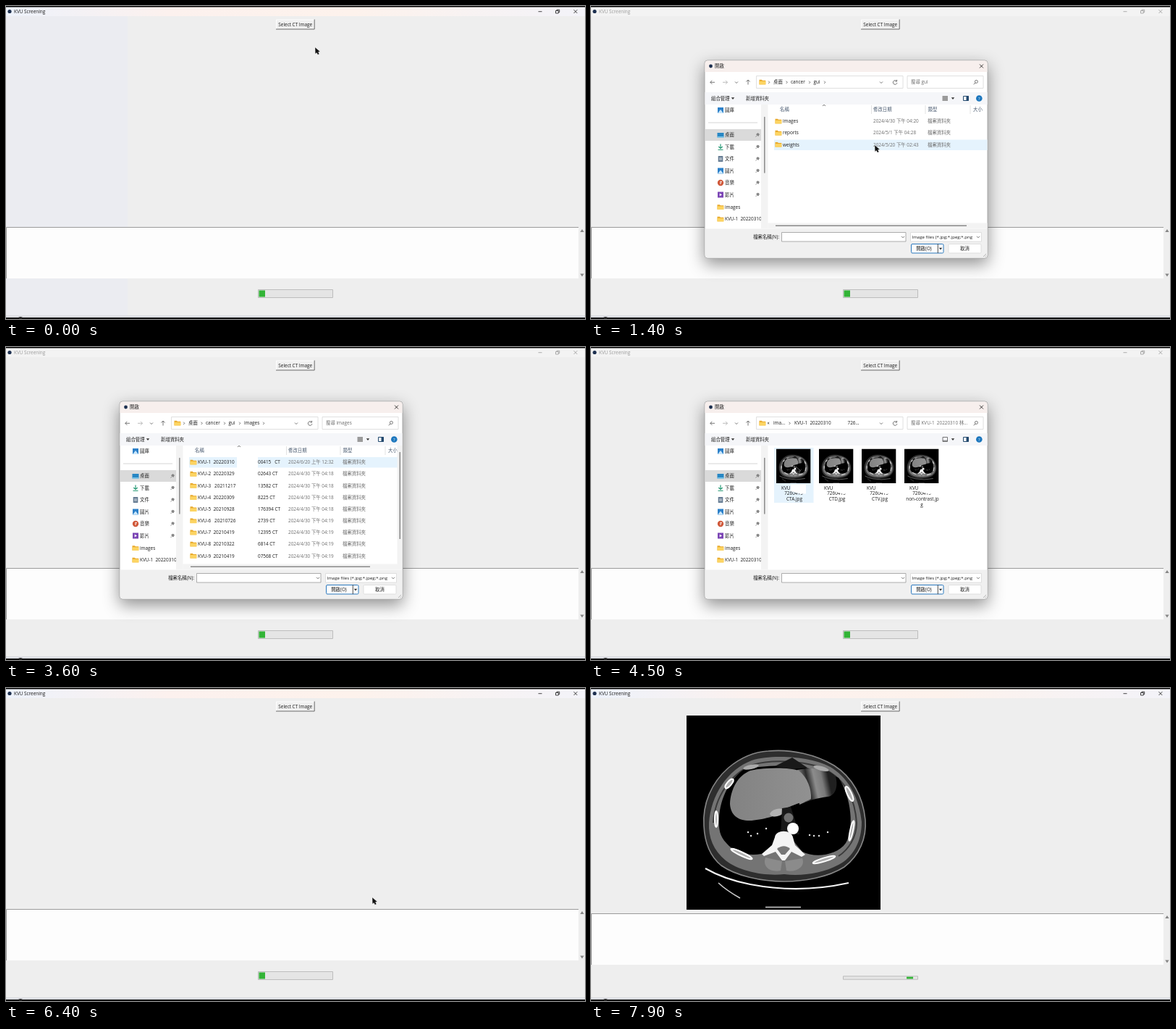
Write an HTML page that moves like this. It is 800 px wide and 432 px high and loops after 8000 ms.

```html
<!DOCTYPE html>
<html lang="zh-Hant">
<head>
<meta charset="utf-8">
<title>KVU Screening</title>
<style>
html, body { margin: 0; width: 800px; height: 432px; overflow: hidden; background: #eee; }
svg { display: block; }
text { font: 6.4px 'Open Sans', 'Noto Sans CJK TC', 'Noto Sans CJK JP', sans-serif; fill: #1c1c1c; white-space: pre; }
.soft { fill: #6d6d6d; }
.head { fill: #47586e; }
.mid { text-anchor: middle; }
.line { fill: none; stroke: #555; stroke-width: .8; }
.box { fill: #fff; stroke: #d9d9d9; stroke-width: .8; }

/* parts that switch on and off */
.s { opacity: 0; animation: 8s step-end infinite; }
.tint { animation-name: tint; }
.active { animation-name: active; }
.idle { animation-name: idle; }
.gui { animation-name: gui; }
.images { animation-name: images; }
.files { animation-name: files; }
.listed { animation-name: listed; }
.row0 { animation-name: row0; }
.row1 { animation-name: row1; }
.row2 { animation-name: row2; }
.picked { animation-name: picked; }
.hover { animation-name: hover; }
.chosen { animation-name: chosen; }
.before { animation-name: before; }
.after { animation-name: after; }
@keyframes tint { 0% { opacity: 1 } 3.75% { opacity: 0 } }
@keyframes active { 0% { opacity: 1 } 12.5% { opacity: 0 } 75% { opacity: 1 } 100% { opacity: 1 } }
@keyframes idle { 12.5% { opacity: 1 } 75% { opacity: 0 } }
@keyframes gui { 12.5% { opacity: 1 } 35% { opacity: 0 } }
@keyframes images { 35% { opacity: 1 } 48.75% { opacity: 0 } }
@keyframes files { 48.75% { opacity: 1 } 75% { opacity: 0 } }
@keyframes listed { 12.5% { opacity: 1 } 48.75% { opacity: 0 } }
@keyframes row2 { 16.25% { opacity: 1 } 22.5% { opacity: 0 } }
@keyframes row1 { 22.5% { opacity: 1 } 24.375% { opacity: 0 } }
@keyframes row0 { 24.375% { opacity: 1 } 28.75% { opacity: 0 } }
@keyframes picked { 28.75% { opacity: 1 } 35% { opacity: 0 } }
@keyframes hover { 55% { opacity: 1 } 58.75% { opacity: 0 } }
@keyframes chosen { 58.75% { opacity: 1 } 75% { opacity: 0 } }
@keyframes before { 0% { opacity: 1 } 81.25% { opacity: 0 } }
@keyframes after { 81.25% { opacity: 1 } 100% { opacity: 1 } }

.dialog { animation: dialog 8s linear infinite; }
@keyframes dialog { 0%, 12.4% { opacity: 0 } 13.75%, 74.9% { opacity: 1 } 75%, 100% { opacity: 0 } }
.low { animation: low 8s step-end infinite; }
@keyframes low { 0% { transform: none } 81.25%, 100% { transform: translateY(6px) } }
.chunk { animation: chunk 8s linear infinite; }
@keyframes chunk { 0%, 80.625% { transform: none } 100% { transform: translateX(93px) } }
.cursor { animation: cursor 8s ease-in-out infinite; }
@keyframes cursor {
  0%, 1.25% { transform: translate(427px, 57px) }
  8.75%, 12.5% { transform: translate(405px, 27px) }
  17.5%, 18.75% { transform: translate(392px, 192px) }
  27.5%, 35% { transform: translate(295px, 157px) }
  41%, 50% { transform: translate(329px, 155px) }
  56.25%, 60% { transform: translate(283px, 165px) }
  68.75% { transform: translate(424px, 306px) }
  72.5%, 75% { transform: translate(457px, 333px) }
  80%, 86% { transform: translate(506px, 289px) }
  94%, 100% { transform: translate(560px, 440px) }
}
</style>
</head>
<body>
<svg width="800" height="432" viewBox="0 0 800 432">
<defs>
  <linearGradient id="bar">
    <stop offset="0" stop-color="#edf2fb"/><stop offset=".28" stop-color="#fcf1ee"/>
    <stop offset=".6" stop-color="#fdf2ec"/><stop offset="1" stop-color="#f3f3f9"/>
  </linearGradient>
  <linearGradient id="heart" x1="0" y1=".2" x2="1" y2="0">
    <stop offset="0" stop-color="#8c8c8c"/><stop offset=".22" stop-color="#2a2a2a"/>
    <stop offset=".4" stop-color="#8c8c8c"/><stop offset=".58" stop-color="#7a7a7a"/><stop offset=".75" stop-color="#202020"/>
  </linearGradient>
  <linearGradient id="liver">
    <stop offset="0" stop-color="#828282"/><stop offset="1" stop-color="#919191"/>
  </linearGradient>
  <clipPath id="side"><path d="M157 136H235V307H157Z"/></clipPath>
  <clipPath id="kind"><path d="M441 312H530V326H441Z"/></clipPath>
  <g id="folder">
    <path d="M-4.5 -3.3H-1.2L0 -2.2H4.3V3.3H-4.5Z" fill="#e8a92c"/>
    <path d="M-4.5 -1.2H4.3V3.5H-4.5Z" fill="#fcd462"/>
  </g>
  <path id="right" class="line" d="M-.9 -1.7L.8 0L-.9 1.7"/>
  <path id="down" class="line" d="M-2 -1L0 1L2 -1"/>
  <path id="drop" d="M-2.2 -1.2H2.2L0 1.4Z" fill="#333"/>
  <g id="pin" stroke="#777" stroke-width=".8"><path d="M-2.5 2.5L-.5 .5"/><path d="M-1.5 -1L1 1.5L2.4 -.9L.9 -2.4Z" fill="#888"/></g>
  <symbol id="scan" viewBox="132.6 38.5 266.8 266.8">
    <path d="M132 38H400V306H132Z"/>
    <path d="M156 190C154 160 166 131 190 110C208 95 228 88 245 87C277 84 311 92 336 107C361 123 376 150 379 182C381 207 371 231 350 247C328 261 295 267 267 267C235 267 200 259 180 245C164 232 157 213 156 190Z" fill="#2e2e2e" stroke="#868686" stroke-width="1.6"/>
    <path d="M163 186C166 148 188 113 222 100C250 91 308 94 334 111C358 127 371 155 374 185C374 212 362 234 342 244C320 256 290 260 267 257C240 260 205 253 186 238C169 224 162 206 163 186Z" fill="#747474"/>
    <path d="M169 186C171 150 193 118 224 106C250 98 305 100 330 116C354 131 365 157 367 186C367 206 356 223 342 232" fill="none" stroke="#3a3a3a" stroke-width="2"/>
    <path d="M177 180C178 151 194 123 212 112C250 104 310 106 342 124C360 150 364 196 352 214C340 231 310 235 292 226L267 196L246 226C225 234 200 230 187 214C178 205 176 194 177 180Z"/>
    <path d="M254 108L278 96L299 110L278 112Z" fill="#191919"/>
    <path d="M285 113C304 109 328 110 338 122C342 137 337 149 327 150C313 152 300 155 288 161Z" fill="url(#heart)"/>
    <path d="M192 160C193 139 203 121 220 114C245 109 275 110 287 114C299 123 305 140 304 153C297 157 284 159 272 165C262 176 240 181 222 183C205 184 193 177 192 160Z" fill="url(#liver)"/>
    <ellipse cx="257" cy="172" rx="10" ry="5" fill="#b4b4b4" transform="rotate(-15 257 172)"/>
    <path d="M264 166L276 164L288 202H262Z" fill="#191919"/>
    <circle cx="273" cy="179" r="6.5" fill="#707070"/>
    <circle cx="279" cy="194" r="8" fill="#fff"/>
    <path d="M241 234L264 239L262 252C250 255 236 248 241 234ZM268 239L292 235C297 248 281 255 270 252Z" fill="#8b8b8b"/>
    <path d="M254 206C255 195 277 195 279 206L282 217L296 230L291 233L277 226L268 238L264 238L255 226L239 232L236 229L250 217Z" fill="#f4f4f4"/>
    <path d="M257 222C263 217 270 217 275 222L268 230H263Z" fill="#777"/>
    <g fill="#b0b0b0" stroke="#fff" stroke-width="2">
      <ellipse cx="191" cy="132" rx="3" ry="8" transform="rotate(40 191 132)"/>
      <ellipse cx="173" cy="181" rx="2" ry="11"/>
      <ellipse cx="208" cy="229" rx="16" ry="2.5" transform="rotate(25 208 229)"/>
      <ellipse cx="357" cy="146" rx="3" ry="11" transform="rotate(-25 357 146)"/>
      <ellipse cx="360" cy="197" rx="2" ry="14" transform="rotate(12 360 197)"/>
      <ellipse cx="322" cy="237" rx="16" ry="2.5" transform="rotate(-17 322 237)"/>
    </g>
    <g fill="#aaa"><ellipse cx="221" cy="109" rx="11" ry="3" transform="rotate(-12 221 109)"/><ellipse cx="318" cy="111" rx="11" ry="3" transform="rotate(15 318 111)"/></g>
    <path d="M217 199h.1M221 204h.1M230 201h.1M242 194h.1M302 203h.1M308 204h.1M315 204h.1M327 199h.1" stroke="#ddd" stroke-width="2.4" stroke-linecap="round"/>
    <path d="M158 249Q184 264 220 271Q288 284 356 269" fill="none" stroke="#f4f4f4" stroke-width="2.2"/>
    <path d="M176 269Q188 280 206 290M241 302.5H290" fill="none" stroke="#ccc" stroke-width="1.6"/>
  </symbol>
</defs>

<path d="M0 0H800V432H0Z" fill="#eee"/>
<path class="s tint" d="M0 14H168V427H0Z" fill="#ebecf1"/>

<!-- main window -->
<path d="M0 1H800V14H0Z" fill="#f3f3f3"/>
<path class="s active" d="M0 1H800V14H0Z" fill="url(#bar)"/>
<circle cx="5" cy="7.5" r="2.6" fill="#1d3050"/>
<g id="caption"></g>
<path d="M0 427H800V430H0Z" fill="#dcdde2"/>
<path d="M0 0H800V1.6H0ZM0 430H800V432H0Z"/>
<ellipse cx="20" cy="430.5" rx="3" ry="1.6" fill="#222"/>
<path d="M373 18.5H426.5V32.5H373Z" fill="#f0f0f0"/>
<path d="M373.5 32V19H426" fill="none" stroke="#fff"/>
<path d="M373 32H426.2V18.5" fill="none" stroke="#6a6a6a"/>
<text class="mid" x="399.8" y="28.2">Select CT Image</text>
<use class="s after" href="#scan" x="132.6" y="38.5" width="266.8" height="266.8"/>
<g class="low">
  <path d="M0 305H791V376H0Z" fill="#fdfdfd"/>
  <path d="M.5 376V305.5H791" fill="none" stroke="#9a9a9a"/>
  <path d="M793.3 312L796 308L798.7 312ZM793.3 369.5L796 373.5L798.7 369.5Z" fill="#868686"/>
</g>
<g class="s before">
  <path d="M348.5 391.5H451.5V402.5H348.5Z" fill="#e5e5e5" stroke="#bdbdbd"/>
  <path class="chunk" d="M349.5 392.5H358V401.5H349.5Z" fill="#32b436"/>
</g>
<g class="s after">
  <path d="M348.5 397.8H451.5V402.2H348.5Z" fill="#e5e5e5" stroke="#bdbdbd"/>
  <path class="chunk" d="M349 398.6H358V401.4H349Z" fill="#32b436"/>
</g>

<!-- file dialog -->
<g class="dialog">
  <rect x="157" y="75" width="391" height="273" rx="4" fill="#fff" stroke="#a8a8a8" style="filter: drop-shadow(0 8px 11px rgba(0,0,0,.42))"/>
  <path d="M157.5 91V79Q157.5 75.5 161 75.5H544Q547.5 75.5 547.5 79V91Z" fill="#f7efed"/>
  <circle cx="165.5" cy="83" r="2.4" fill="#1d3050"/>
  <text x="171" y="85.4">開啟</text>
  <path class="line" style="stroke:#111" d="M537 80.5L542 85.5M542 80.5L537 85.5"/>
  <path class="line" d="M171 105.3H164.8M167.3 102.8L164.8 105.3L167.3 107.8"/>
  <path class="line" style="stroke:#aaa" d="M182 105.3H188.5M186 102.8L188.5 105.3L186 107.8"/>
  <path class="line" d="M217 108.5V102M214.5 104.5L217 102L219.5 104.5"/>
  <use href="#down" x="201" y="105.5"/>
  <path class="box" d="M228.5 96.5H431V113.5H228.5ZM437 96.5H542V113.5H437Z"/>
  <use href="#folder" x="237" y="105"/>
  <use href="#down" x="401" y="105.5"/>
  <path class="line" d="M422.3 103.7A2.8 2.8 0 1 0 422.9 106M422.6 101.8V104H420.4"/>
  <path class="line" d="M531 106L528.7 108.3M534.4 104.4A2 2 0 1 1 530.4 104.4A2 2 0 1 1 534.4 104.4"/>
  <path d="M157.5 119H547.5V136H157.5Z" fill="#f5f6f9"/>
  <text x="166" y="129.7">組合管理</text><use href="#drop" x="196" y="127.5"/>
  <text x="214" y="129.7">新增資料夾</text>
  <path class="s listed" d="M485.5 124H493V131H485.5Z" fill="#9a9a9a"/>
  <path class="s files line" d="M486 124.5H492.5V130.5H486ZM486 129.3H492.5"/>
  <use href="#drop" x="500" y="127.5"/>
  <path d="M514.5 124.5H521.5V130.5H514.5Z" fill="#fff" stroke="#23496e"/><path d="M518.5 124.5H522V130.5H518.5Z" fill="#23496e"/>
  <circle cx="536.3" cy="127.5" r="4.3" fill="#1b76bd"/><text class="mid" x="536.3" y="129.7" style="fill:#fff;font-size:6px">?</text>

  <path d="M235 136H244.5V307H235Z" fill="#f3f3f3"/>
  <g id="places" clip-path="url(#side)"></g>
  <path d="M239.8 153.5V230" stroke="#8a8a8a" stroke-width="1.5" stroke-linecap="round"/>

  <g class="s listed">
    <path d="M387.5 137V149M462 137V149M524 137V149" stroke="#e2e2e2"/>
    <path class="line" d="M320 138L322 136.3L324 138"/>
    <text class="head" x="261" y="144.6">名稱</text><text class="head" x="390" y="144.6">修改日期</text>
    <text class="head" x="465.5" y="144.6">類型</text><text class="head" x="528" y="144.6">大小</text>
    <path d="M244.5 299.5H547.5V307H244.5Z" fill="#f3f3f3"/>
  </g>
  <g class="s gui">
    <g fill="#e5f3fd">
      <path class="s row0" d="M253 152H547.5V166.5H253Z"/>
      <path class="s row1" d="M253 168H547.5V182.5H253Z"/>
      <path class="s row2" d="M253 184.5H547.5V199H253Z"/>
    </g>
    <path class="s picked" d="M253.3 152H547.5V166.3H253.3Z" fill="#cce8ff" stroke="#8fcbf7" stroke-width=".8"/>
    <g id="guiRows"></g>
    <path d="M255 303.3H519" stroke="#8a8a8a" stroke-width="1.6"/>
  </g>
  <g class="s images">
    <path d="M253 152H541V166.5H253Z" fill="#e5f3fd"/>
    <path d="M540.5 136H547.5V300H540.5Z" fill="#f3f3f3"/>
    <g id="imageRows"></g>
    <path d="M255 303.3H503M544.3 145V265" stroke="#8a8a8a" stroke-width="1.6"/>
  </g>
  <g class="s files" id="thumbs">
    <path class="s hover" d="M253 139H307.5V215H253Z" fill="#e5f3fd"/>
    <path class="s chosen" d="M253 139H307.5V215H253Z" fill="#cce8ff"/>
  </g>
  <g id="trail"></g>

  <path d="M157.5 307.5H547.5V344Q547.5 347.5 544 347.5H161Q157.5 347.5 157.5 344Z" fill="#f0f0f0"/>
  <text x="260" y="320.6" text-anchor="end">檔案名稱(N):</text>
  <path class="box" style="stroke:#9a9a9a" d="M263.5 312.5H435V325H263.5Z"/><use href="#down" x="431" y="318.8"/>
  <path class="box" d="M441.5 312.5H539.5V325H441.5Z"/><use href="#down" x="535" y="318.8"/>
  <text x="443.5" y="320.6" clip-path="url(#kind)" style="font-size:6.1px">Image files (*.jpg;*.jpeg;*.png</text>
  <g class="s chosen"><text x="265" y="320.6">KVU</text><text x="300" y="320.6">7260415  CTA.jpg</text></g>
  <rect x="442.5" y="328.5" width="44.5" height="12.5" rx="1.5" fill="#fdfdfd" stroke="#2b78bd"/>
  <path d="M479.3 328.5V341" stroke="#222" stroke-width=".8"/><use href="#drop" x="483" y="335"/>
  <text class="mid" x="460" y="337">開啟(O)</text>
  <rect x="494" y="328.5" width="45" height="12.5" rx="1.5" class="box"/>
  <text class="mid" x="516.5" y="337">取消</text>
  <path d="M546 342L542 346M546 344.5L544.5 346" stroke="#aaa" stroke-width=".8"/>
</g>

<path class="cursor" d="M0 0L.3 9L2.3 7.4L3.8 10.2L5.8 9.2L4.4 6.4L7 6Z" fill="#111" stroke="#fff" stroke-width=".3"/>
<path class="s images" d="M319 151H348V299H319Z" fill="#fff"/>
</svg>

<script>
const fill = (id, html) => document.getElementById(id).insertAdjacentHTML('beforeend', html);
const text = (x, y, s, cls = '') => `<text x="${x}" y="${y + 2.3}" class="${cls}">${s}</text>`;
const use = (id, x, y) => `<use href="#${id}" x="${x}" y="${y}"/>`;

const caption = (cls, ink) => `<g class="s ${cls}"><text x="11" y="9.9" style="fill:${ink}">KVU Screening</text>
  <path d="M735.5 7.7H740.5M759.5 6.5H763.3V10H759.5ZM761 6.3V5.2H764.7V8.7H763.5M784.5 5.2L789.3 10M789.3 5.2L784.5 10"
  fill="none" stroke="${ink}" stroke-width=".8"/></g>`;
fill('caption', caption('active', '#1a1a1a') + caption('idle', '#9a9a9a'));

// sidebar
const picture = '<path d="M-4 -4H4V4H-4Z" fill="#2c80c9"/><path d="M-4 4L0 -1L4 4Z" fill="#c9e6fa"/>';
const places = [
  ['圖庫', 144, picture],
  ['桌面', 178, '<path d="M-4.5 -3H4.5V3.5H-4.5Z" fill="#2887c4"/><path d="M-4.5 2H4.5V3.5H-4.5Z" fill="#7cc7ea"/>'],
  ['下載', 194.5, '<path d="M0 -4V2M-2.7 -.5L0 2.2L2.7 -.5M-3.5 4H3.5" fill="none" stroke="#2c9c78" stroke-width="1.2"/>'],
  ['文件', 211, '<path d="M-3.3 -4H3.3V4H-3.3Z" fill="#667c93"/><path d="M-2 -1H2M-2 1H2" stroke="#fff" stroke-width=".8"/>'],
  ['圖片', 227.5, picture],
  ['音樂', 244, '<circle r="4.2" fill="#d0583a"/><path d="M0 2V-2L2 -1" fill="none" stroke="#fff"/>'],
  ['影片', 260.5, '<path d="M-4 -4H4V4H-4Z" fill="#7b45b5"/><path d="M-1.3 -2L2 0L-1.3 2Z" fill="#fff"/>'],
];
fill('places', '<path d="M158 170H235V186H158Z" fill="#dadada"/><path d="M162 161H230" stroke="#d5d5d5"/>' +
  places.map(([name, y, icon], i) => `<g transform="translate(179 ${y})">${icon}</g>` +
    text(185, y, name) + (i ? use('pin', 230, y) : '')).join('') +
  ['images', 'KVU-1  20220310', ''].map((name, i) => {
    const y = 277.5 + 16.5 * i;
    return use('folder', 179, y) + text(185, y, name);
  }).join(''));

// folder lists
const row = (i, name, date, rest = '') => {
  const y = 159 + 16.15 * i;
  return use('folder', 259, y) + text(265, y, name) + text(348, y, rest) +
    text(390, y, date, 'soft') + text(465, y, '檔案資料夾', 'soft');
};
fill('guiRows', row(0, 'images', '2024/4/30 下午 04:20') +
  row(1, 'reports', '2024/5/1 下午 04:28') + row(2, 'weights', '2024/5/20 下午 02:43'));
const days = ['  20220310', '  20220329', '   20211217', '  20220309', '  20210928',
  '   20210726', '  20210419', '  20210322', '  20210419'];
const tails = ['00415  ', '02643', '13582', '8225', '176394', '2739', '12395', '6814', '07568'];
fill('imageRows', days.map((day, i) => row(i, `KVU-${i + 1}${day}`,
  i ? `2024/4/30 下午 04:1${i < 5 ? 8 : 9}` : '2024/6/20 上午 12:32', tails[i] + ' CT')).join(''));

// thumbnails
fill('thumbs', ['CTA.jpg', 'CTD.jpg', 'CTV.jpg', 'non-contrast.jp'].map((name, i) => {
  const x = 256 + 59 * i, c = x + 24;
  return `<use href="#scan" x="${x}" y="140.5" width="47.5" height="47.5"/>` +
    text(c, 202, '7260415', 'mid') +
    `<path d="M${x + 20} 190H${x + 41}V202.5H${x + 34}L${x + 20} 199Z" fill="#fff"/>` +
    text(x + 7, 194.5, 'KVU') + text(c + 1, 210, name, 'mid') + (i > 2 ? text(c, 218, 'g', 'mid') : '');
}).join(''));

// address bar and search box
const trail = (cls, names, arrows, query) => `<g class="s ${cls}">` +
  names.map(([x, s]) => text(x, 105, s)).join('') + arrows.map(x => use('right', x, 105.3)).join('') +
  text(442, 105, '搜尋 ' + query, 'soft') + '</g>';
const path = [[252, '桌面'], [276, 'cancer'], [307.5, 'gui']];
fill('trail', trail('gui', path, [246, 270.5, 302, 323], 'gui') +
  trail('images', [...path, [329, 'images']], [246, 270.5, 302, 323, 356], 'images') +
  trail('files', [[243.5, '«'], [252, 'ima...'], [281, 'KVU-1  20220310'], [354.5, '726...']], [274.5], 'KVU-1  20220310 林...'));
</script>
</body>
</html>
```
